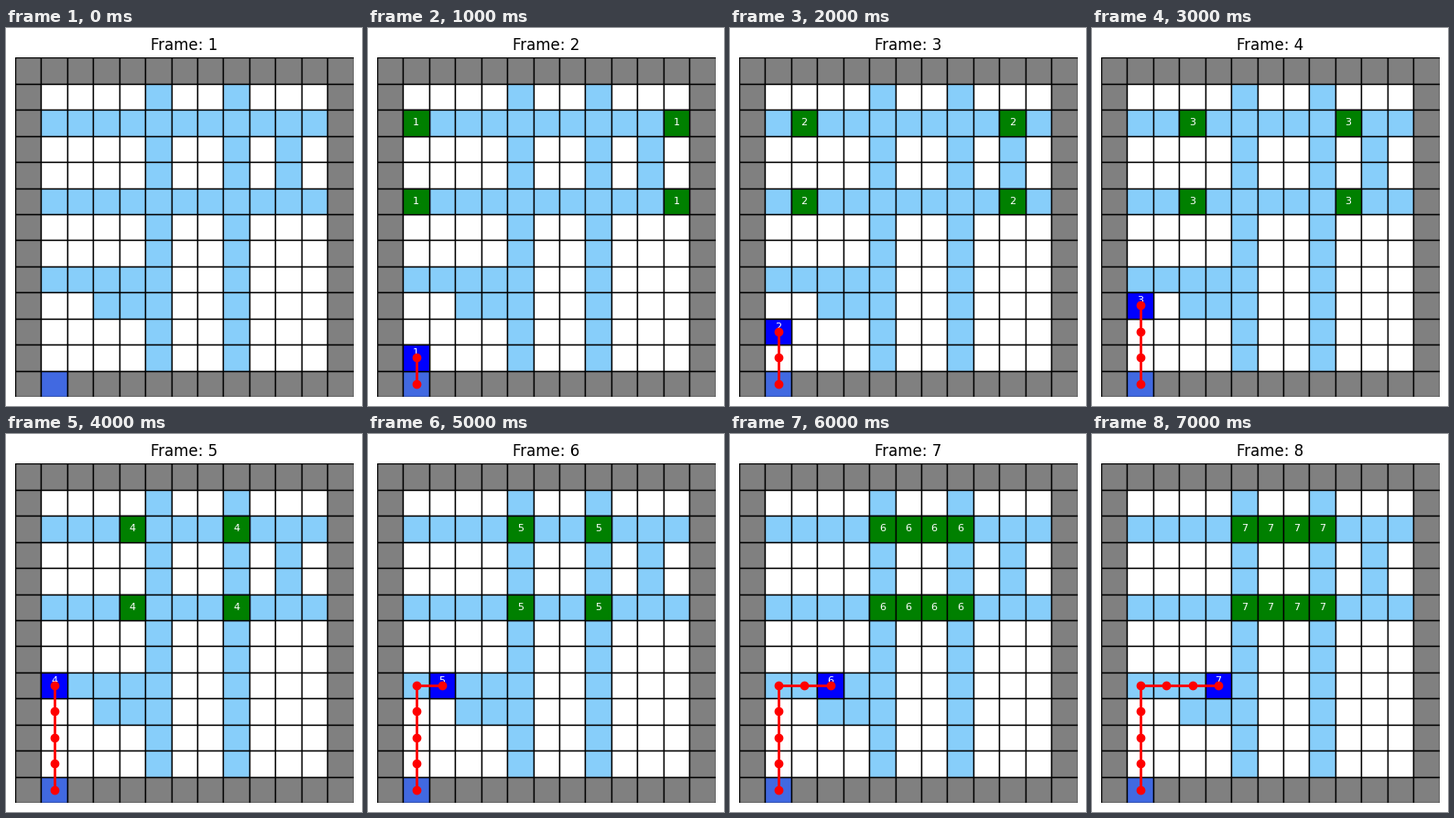
Write a matplotlib script that moves like this. It is 389 px wide and 412 px high and loops after 8 s.

```python
import matplotlib.pyplot as plt
from matplotlib.animation import FuncAnimation
from matplotlib.patches import Rectangle

W, H, DPI = 389, 412, 100
SIDE, PAD = 369.6, 10
N = 13
STEPS = 8

ROADS = {(c, r) for r in (2, 5) for c in range(1, 12)}
ROADS |= {(c, r) for c in (5, 8) for r in range(1, 12)}
ROADS |= {(c, 8) for c in range(1, 6)} | {(c, 9) for c in range(3, 6)}
ROADS |= {(10, 3), (10, 4)}
START = (1, 12)

fig = plt.figure(figsize=(W / DPI, H / DPI), dpi=DPI, facecolor="white")
ax = fig.add_axes([PAD / W, PAD / H, SIDE / W, SIDE / H])


def cell_color(c, r):
    if (c, r) == START:
        return "royalblue"
    if c in (0, N - 1) or r in (0, N - 1):
        return "gray"
    return "lightskyblue" if (c, r) in ROADS else "white"


def draw_cell(c, r, color):
    ax.add_patch(Rectangle((c, r), 1, 1, facecolor=color,
                           edgecolor="black", linewidth=1))


def label(c, r, text, va):
    ax.text(c + 0.5, r + 0.5, text, color="white", fontsize=8,
            ha="center", va=va)


def runner(t):
    """Climb four cells, then turn right."""
    return 1 + max(0, t - 4), 12 - min(t, 4)


def chaser_columns(t):
    """Close in from both sides, then fill the gap between the crossings."""
    if t < 6:
        return [min(t, 5), max(12 - t, 8)]
    return range(5, 9)


def draw(t):
    ax.clear()
    ax.set_xlim(0, N)
    ax.set_ylim(N, 0)
    ax.axis("off")
    ax.set_title(f"Frame: {t + 1}", fontsize=12)
    for r in range(N):
        for c in range(N):
            draw_cell(c, r, cell_color(c, r))
    if t == 0:
        return []

    for r in (2, 5):
        for c in chaser_columns(t):
            draw_cell(c, r, "green")
            label(c, r, t, "center")

    c, r = runner(t)
    draw_cell(c, r, "blue")
    label(c, r, t, "bottom")
    path = [runner(k) for k in range(t + 1)]
    ax.plot([x + 0.5 for x, _ in path], [y + 0.5 for _, y in path],
            "o-", color="red", linewidth=2, markersize=6, zorder=5)
    return []


anim = FuncAnimation(fig, draw, frames=STEPS, init_func=lambda: draw(0),
                     interval=1000, repeat=True, repeat_delay=0)
plt.show()
```
